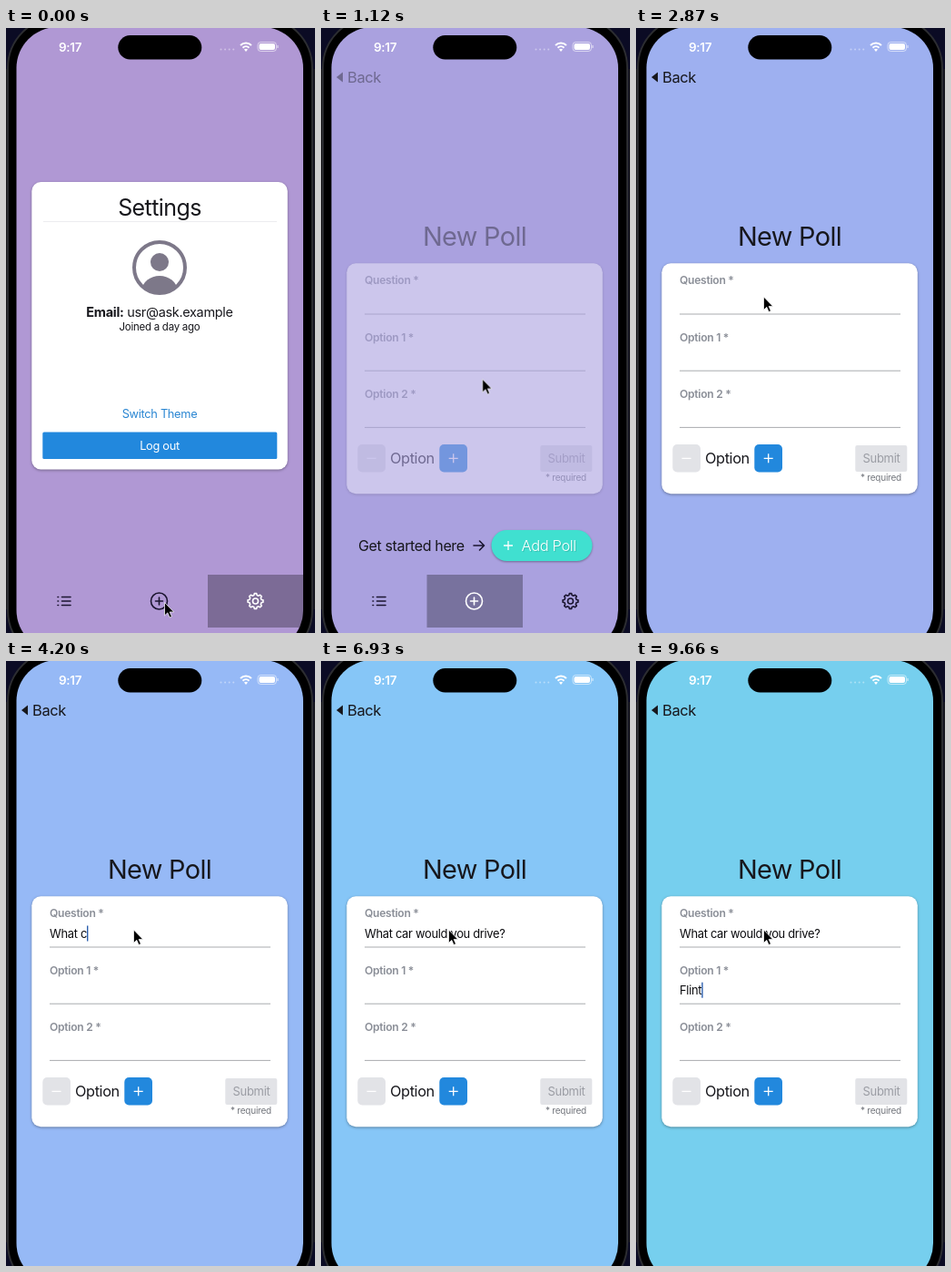
Recreate the animation shown at these times as an HTML page. Size 340x664 px, loop 9730 ms.

```html
<!DOCTYPE html>
<html lang="en">
<head>
<meta charset="utf-8">
<title>Poll app</title>
<style>
  html, body { margin: 0; width: 340px; height: 664px; overflow: hidden; background: #000; }
  svg { display: block; }
  text { font-family: Inter, "Open Sans", sans-serif; letter-spacing: -.023em; white-space: pre; fill: #17171c; }
  .mid { text-anchor: middle; }
  .label { font-size: 12.1px; font-weight: 600; fill: #8a8e97; }
  .entry { font-size: 12.9px; fill: #0c0c0f; }
  .card { fill: #fff; filter: drop-shadow(0 1.5px 1.5px rgba(0, 0, 0, .35)); }
  .grey { fill: #e2e3e7; }
  .blue { fill: #2288dd; }
  .rule { stroke: #a9acaf; stroke-width: 1; }
  .icon { fill: none; stroke: #1b1530; stroke-width: 1.6; stroke-linecap: round; stroke-linejoin: round; }
  .icon.active { stroke: #fff; }
</style>
</head>
<body>
<svg width="340" height="664" viewBox="0 0 340 664">
  <defs>
    <clipPath id="screenClip"><rect x="11.5" y="-1" width="315.500" height="685" rx="45"/></clipPath>
    <clipPath id="avatarClip"><circle cx="169" cy="263" r="28"/></clipPath>
  </defs>

  <rect width="340" height="664" fill="#0b0b24"/>
  <rect x="2" y="-12" width="335" height="707" rx="56" fill="#000" stroke="#2c2d31" stroke-width="2"/>
  <path d="M0 45V638M339.500 45V638" stroke="#1b1b1e" stroke-width="2"/>

  <g clip-path="url(#screenClip)">
    <rect id="backdrop" y="-3" width="340" height="690"/>

    <g id="settings">
      <rect class="card" x="28.300" y="169" width="281.500" height="315.500" rx="10"/>
      <text class="mid" x="169" y="206" font-size="25">Settings</text>
      <path d="M41 212.500H298" stroke="#ececef"/>
      <g fill="#7d7889">
        <circle cx="169" cy="263" r="28" fill="none" stroke="#7d7889" stroke-width="4"/>
        <circle cx="169" cy="257" r="10"/>
        <ellipse cx="169" cy="287" rx="19" ry="15" clip-path="url(#avatarClip)"/>
      </g>
      <text class="mid" x="169" y="317" font-size="14.500"><tspan font-weight="700">Email:</tspan> usr@ask.example</text>
      <text class="mid" x="169" y="332" font-size="11.500">Joined a day ago</text>
      <text class="mid" x="169" y="428" font-size="12.800" style="fill:#2a86d2">Switch Theme</text>
      <rect class="blue" x="40.300" y="443.500" width="258" height="29.500" rx="1.500"/>
      <text class="mid" x="169" y="463" font-size="12.800" style="fill:#fff">Log out</text>
    </g>

    <g id="tabs">
      <g id="starter">
        <text x="41" y="573.500" font-size="16">Get started here</text>
        <path class="icon" d="M168 568H179M174.500 563L179.500 568L174.500 573"/>
        <rect x="187.500" y="551" width="111" height="34" rx="17" fill="#40e0d0" style="filter:drop-shadow(0 1px 1px rgba(0,0,0,.35))"/>
        <path d="M201 568H211M206 563V573" stroke="#fff" stroke-width="1.300"/>
        <text x="220.500" y="573.500" font-size="16.500" font-weight="300" style="fill:#fff;filter:drop-shadow(1px 1px 0 rgba(0,0,0,.15))">Add Poll</text>
      </g>
      <rect id="highlight" y="600" width="105.500" height="58" opacity=".295"/>
      <path class="icon" d="M61.500 624.500H71M61.500 629H71M61.500 633.500H71M57 624.500h.6M57 629h.6M57 633.500h.6"/>
      <path id="addIcon" class="icon" d="M159.500 629a9 9 0 1 0 18 0a9 9 0 1 0 -18 0M164.500 629H172.500M168.500 625V633"/>
      <path id="gearIcon" class="icon"/>
    </g>

    <g id="poll">
      <path d="M17 54L24 48.500V59.500Z" fill="#17171c"/>
      <text x="29" y="59.500" font-size="16.500">Back</text>
      <text class="mid" x="169" y="239" font-size="28.900">New Poll</text>
      <rect class="card" x="28.300" y="258.300" width="281.500" height="253" rx="10"/>
      <g id="fields"></g>
      <rect class="grey" x="40.300" y="457" width="30.700" height="30.500" rx="5"/>
      <path d="M50.500 472.300H60.500" stroke="#fff" stroke-width="1.300"/>
      <text x="76" y="478" font-size="16.300">Option</text>
      <rect class="blue" x="130.300" y="457" width="30.700" height="30.500" rx="5"/>
      <path d="M140.700 472.300H150.700M145.700 467.300V477.300" stroke="#fff" stroke-width="1.300"/>
      <rect class="grey" x="241.300" y="458" width="57" height="29" rx="2"/>
      <text class="mid" x="270" y="477" font-size="13" style="fill:#9b9da4">Submit</text>
      <text x="247" y="497.300" font-size="10" style="fill:#74777e">* required</text>
      <rect id="caret" width="1.400" height="17" fill="#2c5fae"/>
    </g>

    <text x="58" y="25.500" font-size="13.500" font-weight="600" style="fill:#fff">9:17</text>
    <path d="M236.500 23.500H252" stroke="#fff" stroke-opacity=".4" stroke-width="2" stroke-linecap="round" stroke-dasharray="0 4.600"/>
    <path d="M258 19A8.500 8.500 0 0 1 270 19M260.500 21.700A5 5 0 0 1 267.500 21.700" fill="none" stroke="#fff" stroke-width="2"/>
    <path d="M262 23.500Q264 22 266 23.500L264 26Z" fill="#fff"/>
    <rect x="277" y="15.500" width="20.500" height="10" rx="3.300" fill="none" stroke="#fff" stroke-opacity=".55"/>
    <rect x="278.500" y="17" width="17.500" height="7" rx="2" fill="#fff"/>
    <path d="M299 19v3" stroke="#fff" stroke-opacity=".6" stroke-width="1.300"/>
  </g>
  <rect x="123.300" y="8" width="92" height="26.500" rx="13.250"/>

  <g id="pointer">
    <g id="touch" fill="none">
      <circle r="20.300" stroke="#fff" stroke-width="1.500"/>
      <circle r="21.500" stroke="#000" stroke-width="1.500"/>
    </g>
    <path transform="translate(.5 .5) scale(.9)" d="M0 0V16L3.700 12.600L6.200 18.300L8.800 17.200L6.300 11.600H11.300Z" fill="#000" stroke="#fff" stroke-width=".8"/>
  </g>
</svg>

<script>
const LOOP = 9730;
const ADD_TAB_AT = 280, FADE_START = 1000, FADE_TIME = 300, TABS_GONE_AT = 1330;
const FOCUS_AT = 1880;
const FIELD_TOP = 281, FIELD_STEP = 62.2;
const BACKDROP = [
  [0, 176, 152, 212], [770, 173, 158, 219], [1260, 169, 162, 224], [2870, 158, 176, 240],
  [5670, 141, 194, 252], [8260, 126, 203, 242], [LOOP, 118, 207, 238]
];
const POINTER = [
  [0, 174, 630], [320, 174, 630], [670, 214, 571], [920, 214, 571],
  [1260, 156, 278], [1500, 140, 294.5], [LOOP, 140, 294.5]
];
const TOUCHES = [[140, 300], [700, 900], [1700, 1860]];
const ENTRIES = [
  { label: 'Question *', text: 'What car would you drive?', focus: FOCUS_AT, start: 3480, pace: 121 },
  { label: 'Option 1 *', text: 'Flint', focus: 8480, start: 8580, pace: 200 },
  { label: 'Option 2 *', text: '', focus: Infinity, start: Infinity, pace: 1 }
];

const $ = id => document.getElementById(id);
const show = (el, visible) => el.style.display = visible ? '' : 'none';
const clamp = x => Math.max(0, Math.min(1, x));

function sample(keys, t, ease = x => x) {
  const next = Math.max(1, keys.findIndex(k => k[0] > t));
  const a = keys[next - 1], b = keys[next];
  const p = ease((t - a[0]) / (b[0] - a[0]));
  return a.slice(1).map((v, i) => v + (b[i + 1] - v) * p);
}

function gear(cx, cy, teeth) {
  const points = [];
  for (let i = 0; i < teeth; i++)
    for (const [offset, r] of [[-.3, 6.8], [-.18, 8.5], [.18, 8.5], [.3, 6.8]]) {
      const angle = (i + offset) * 2 * Math.PI / teeth;
      points.push((cx + r * Math.sin(angle)).toFixed(2) + ' ' + (cy - r * Math.cos(angle)).toFixed(2));
    }
  return `M${points.join('L')}ZM${cx - 3} ${cy}a3 3 0 1 0 6 0a3 3 0 1 0 -6 0`;
}

$('gearIcon').setAttribute('d', gear(274.5, 629, 8));
$('fields').innerHTML = ENTRIES.map((entry, i) => {
  const y = FIELD_TOP + i * FIELD_STEP;
  return `<text class="label" x="48" y="${y + .3}">${entry.label}</text>
    <text class="entry" x="48" y="${y + 22.5}"></text>
    <path class="rule" d="M48 ${y + 33}H291"/>`;
}).join('');
const inputs = [...document.querySelectorAll('.entry')];

function drawEntries(t) {
  let caretOn = false;
  ENTRIES.forEach(({ text, focus, start, pace }, i) => {
    const count = t < start ? 0 : Math.min(text.length, Math.floor((t - start) / pace) + 1);
    const typed = text.slice(0, count);
    if (inputs[i].textContent !== typed) inputs[i].textContent = typed;
    if (t < focus) return;
    const lastKey = count ? start + (count - 1) * pace : focus;
    caretOn = (t - lastKey) % 1000 < 500;
    $('caret').setAttribute('x', 48 + (typed ? inputs[i].getComputedTextLength() : 0));
    $('caret').setAttribute('y', FIELD_TOP + 9.5 + i * FIELD_STEP);
  });
  show($('caret'), caretOn);
}

function draw(t) {
  const onAddTab = t >= ADD_TAB_AT;
  $('backdrop').setAttribute('fill', `rgb(${sample(BACKDROP, t).map(Math.round)})`);
  show($('settings'), !onAddTab);
  show($('starter'), onAddTab);
  show($('tabs'), t < TABS_GONE_AT);
  $('highlight').setAttribute('x', onAddTab ? 116.5 : 222);
  $('addIcon').classList.toggle('active', onAddTab);
  $('gearIcon').classList.toggle('active', !onAddTab);
  $('poll').setAttribute('opacity', clamp((t - FADE_START) / FADE_TIME));
  drawEntries(t);

  const [x, y] = sample(POINTER, t, p => p * p * (3 - 2 * p));
  $('pointer').setAttribute('transform', `translate(${x} ${y})`);
  show($('touch'), TOUCHES.some(([from, to]) => t >= from && t < to));
}

const origin = performance.now();
function tick() {
  draw((performance.now() - origin) % LOOP);
  requestAnimationFrame(tick);
}
tick();
</script>
</body>
</html>
```
